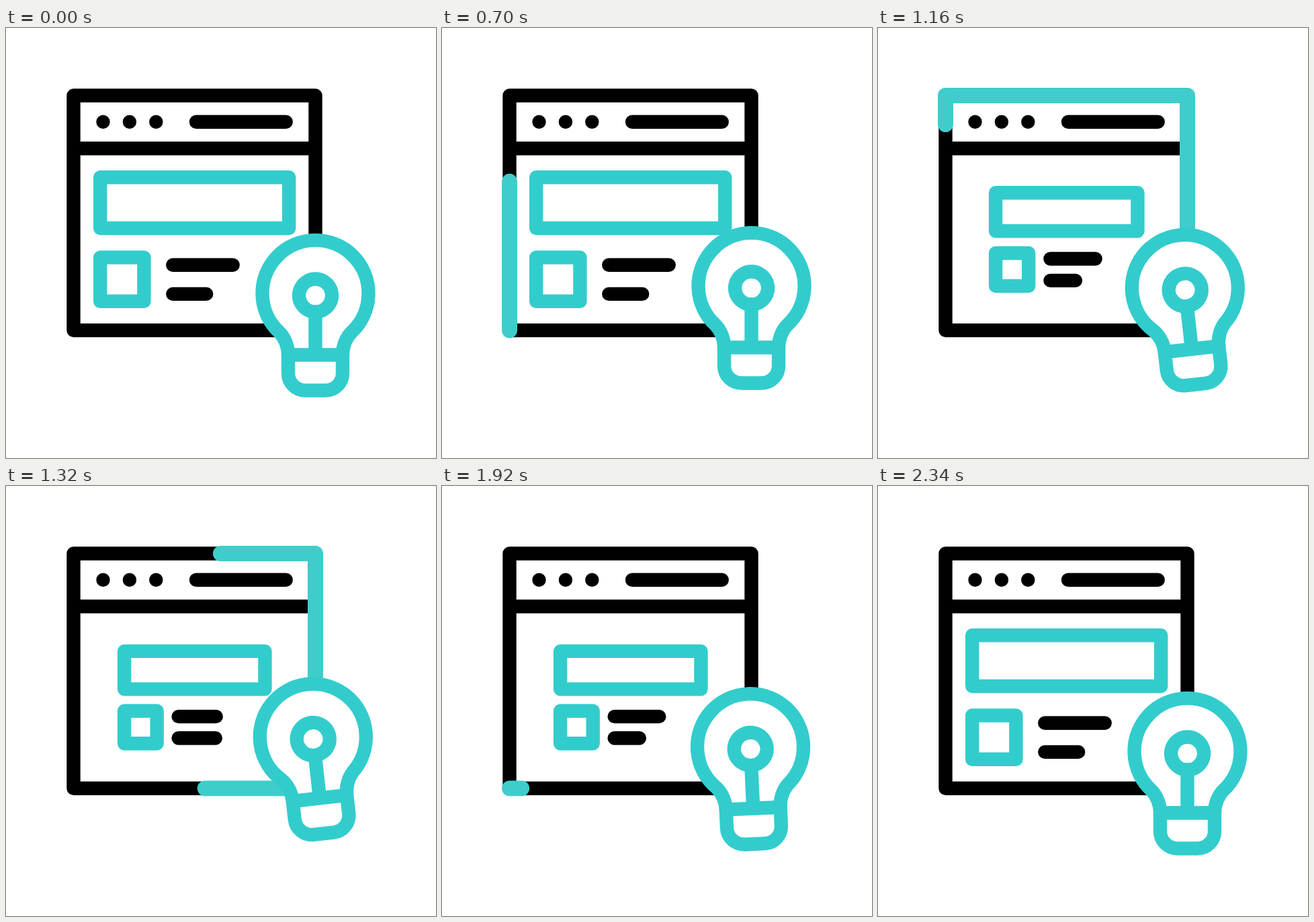
Write an HTML page with a canvas that moves like this. It is 640 by 640 pixels and loops after 2.4 s.

```html
<!DOCTYPE html>
<html lang="en">
<head>
<meta charset="utf-8">
<title>Web idea</title>
<style>
  html, body { margin: 0; height: 100%; overflow: hidden; background: #fff; }
  canvas { display: block; }
</style>
</head>
<body>
<canvas id="stage" width="640" height="640"></canvas>
<script>
const ctx = document.getElementById('stage').getContext('2d');
const TEAL = '#33cccc', TRAIL = '#3ecdcb', INK = '#000';
const LOOP = 2400, STEP = 20, BEAT = 240;
const LEFT = 100.5, TOP = 100.5, RIGHT = 460.5, BOTTOM = 450;
const WIDTH = RIGHT - LEFT, HEIGHT = BOTTOM - TOP;
const PERIMETER = 2 * (WIDTH + HEIGHT);
const PIVOT = { x: 460.5, y: 428 };

const bulb = new Path2D(`M407 453 A79 79 0 1 1 514 453 C506 461 501 474 501 486
  V514 A25.5 25.5 0 0 1 475.5 539.5 H445.5 A25.5 25.5 0 0 1 420 514
  V486 C420 474 415 461 407 453 Z`);
const filament = new Path2D(`M420 486.5 H501 M460.5 486 V422.5
  A24.5 24.5 0 1 1 460.6 422.5`);

const mix = (a, b, p) => a + (b - a) * p;

// Eased 0..1 progress of t between two times.
function progress(t, start, end) {
  const x = Math.min(1, Math.max(0, (t - start) / (end - start)));
  return x * x * (3 - 2 * x);
}

// Rises to 1 at the middle time and falls back to 0.
const pulse = (t, start, middle, end) =>
  progress(t, start, middle) - progress(t, middle, end);

// Leaves 0, alternates between a and b once per beat, then returns to 0.
function swing(t, start, first, last, end, a, b) {
  if (t < first) return mix(0, a, progress(t, start, first));
  const beat = Math.floor((Math.min(t, last) - first) / BEAT);
  const [from, to] = beat % 2 ? [b, a] : [a, b];
  if (t >= last) return mix(from, 0, progress(t, last, end));
  const begin = first + beat * BEAT;
  return mix(from, to, progress(t, begin, begin + BEAT));
}

function stroke(color, width = 20.4, path) {
  ctx.strokeStyle = color;
  ctx.lineWidth = width;
  path ? ctx.stroke(path) : ctx.stroke();
}

function line(x1, x2, y) {
  ctx.beginPath();
  ctx.moveTo(x1, y);
  ctx.lineTo(x2, y);
  stroke(INK);
}

function box(x, y, w, h, color) {
  ctx.beginPath();
  ctx.rect(x, y, w, h);
  stroke(color);
}

function drawWindow() {
  box(LEFT, TOP, WIDTH, HEIGHT, INK);
  line(LEFT + 5, RIGHT - 5, 179.2);
  line(283, 416.7, 139.8);
  for (let i = 0; i < 3; i++) line(144.5 + 39.4 * i, 144.51 + 39.4 * i, 139.8);
}

function drawContent(t) {
  const scale = 1 - .255 * (progress(t, 800, 1200) - progress(t, 1920, 2330));
  const swap = pulse(t, 1200, 1560, 1920);
  const X = x => mix(281, x, scale), Y = y => mix(315, y, scale);
  box(X(140.2), Y(222.2), 281 * scale, 75.8 * scale, TEAL);
  box(X(140.2), Y(341.5), 65.2 * scale, 65.2 * scale, TEAL);
  line(X(248.3), X(337.7) - 40.6 * swap, Y(352.8));
  line(X(248.3), X(298.2) + 69.2 * swap, Y(395.9));
}

// Point on the window border, clockwise from the bottom left corner.
function borderPoint(d) {
  if (d <= HEIGHT) return [LEFT, BOTTOM - d];
  d -= HEIGHT;
  if (d <= WIDTH) return [LEFT + d, TOP];
  d -= WIDTH;
  if (d <= HEIGHT) return [RIGHT, TOP + d];
  return [RIGHT - (d - HEIGHT), BOTTOM];
}

function drawTrail(t) {
  const head = PERIMETER * progress(t, 400, 1600);
  const tail = PERIMETER * progress(t, 800, 2000);
  if (head === tail) return;
  const corners = [HEIGHT, HEIGHT + WIDTH, 2 * HEIGHT + WIDTH];
  ctx.beginPath();
  for (const d of [tail, ...corners.filter(c => c > tail && c < head), head]) {
    ctx.lineTo(...borderPoint(d));
  }
  stroke(TRAIL, 23);
}

function drawBulb(t) {
  const lift = swing(t, 200, 340, 1780, 2000, -22, 0);
  const tilt = swing(t, 760, 1000, 1720, 2000, 13.2, -13.2);
  const nudge = 27 * pulse(t, 2000, 2160, 2330);
  ctx.save();
  ctx.translate(PIVOT.x + nudge, PIVOT.y + lift);
  ctx.rotate(tilt * Math.PI / 180);
  ctx.translate(-PIVOT.x, -PIVOT.y);
  ctx.fillStyle = '#fff';
  ctx.fill(bulb);
  stroke(TEAL, 20.4, bulb);
  stroke(TEAL, 20.4, filament);
  ctx.restore();
}

function frame(now) {
  const t = Math.floor(now / STEP) * STEP % LOOP;
  ctx.fillStyle = '#fff';
  ctx.fillRect(0, 0, 640, 640);
  ctx.lineCap = ctx.lineJoin = 'round';
  drawWindow();
  drawContent(t);
  drawTrail(t);
  drawBulb(t);
  requestAnimationFrame(frame);
}
frame(0);
</script>
</body>
</html>
```
